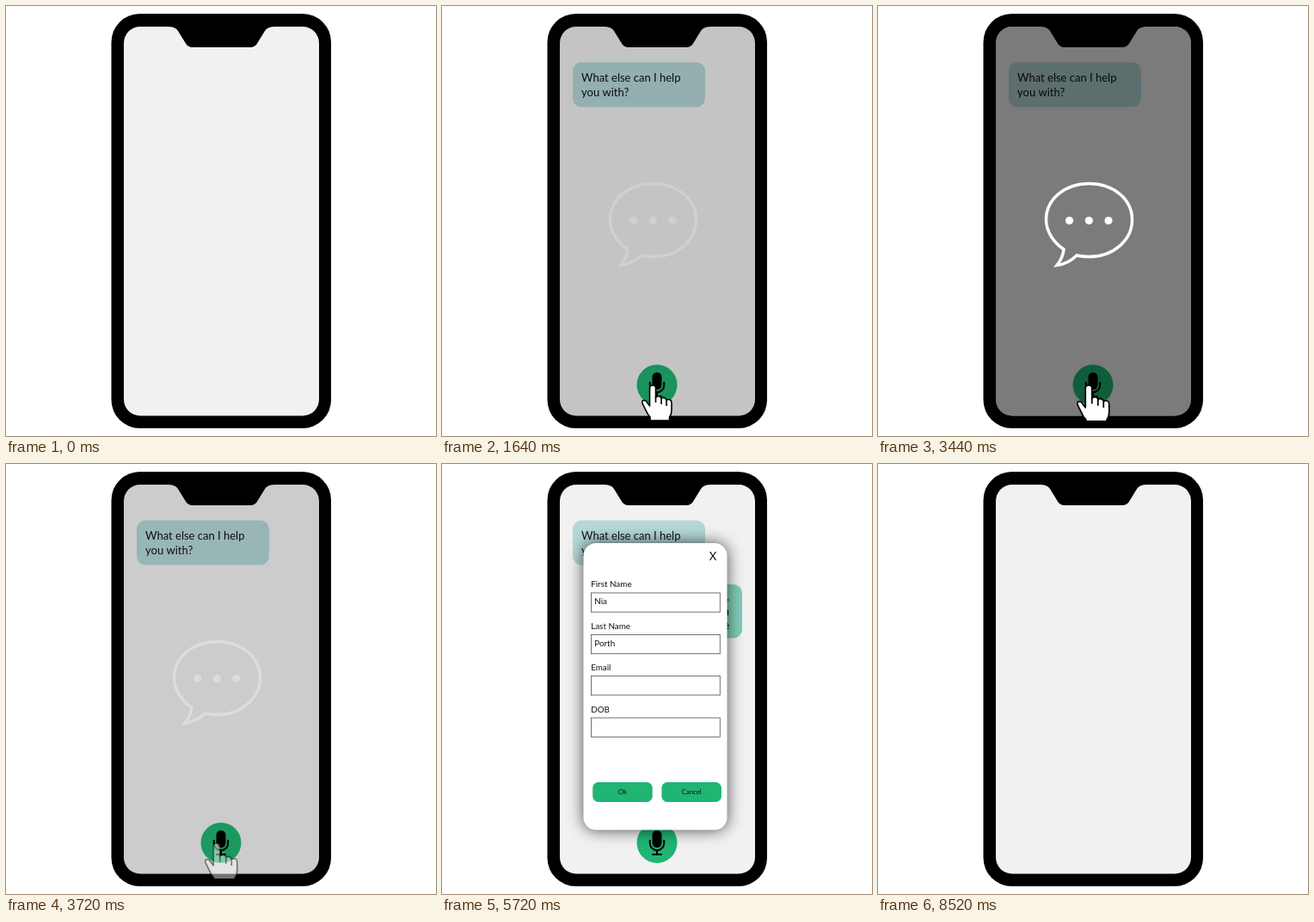
Animation of 500x500 px, one loop 9 s. Source, as an HTML page with a canvas:

```html
<!DOCTYPE html>
<html lang="en">
<head>
<meta charset="utf-8">
<title>Voice assistant</title>
<style>
html, body { margin: 0; width: 100%; height: 100%; overflow: hidden; background: #fff; }
canvas { display: block; width: 500px; height: 500px; }
</style>
</head>
<body>
<canvas id="stage" width="500" height="500"></canvas>
<script>
const ctx = document.getElementById('stage').getContext('2d');
const LOOP = 9000, STEP = 40;
const GREEN = '#20b573';

const clamp = v => Math.max(0, Math.min(1, v));
const ramp = (t, a, b) => clamp((t - a) / (b - a));
const easeOut = p => 1 - (1 - p) ** 2;

function layer(alpha, draw) {
  if (alpha <= 0) return;
  ctx.save();
  ctx.globalAlpha *= alpha;
  draw();
  ctx.restore();
}

function box(x, y, w, h, r, fill) {
  ctx.beginPath();
  ctx.roundRect(x, y, w, h, r);
  ctx.fillStyle = fill;
  ctx.fill();
}

function text(str, x, y, size, align = 'left') {
  ctx.font = `${size}px Lato, "Open Sans", sans-serif`;
  ctx.textAlign = align;
  ctx.fillStyle = '#111';
  ctx.fillText(str, x, y);
}

const screen = new Path2D();
screen.roundRect(137, 24, 227, 452.5, 19);

const notch = new Path2D(
  'M188 23V24Q197 24 200 29L208 42Q211 48 217 48H284Q290 48 293 42L301 29Q304 24 313 24V23Z');

const bubbleIcon = new Path2D(
  'M216 283C206 276 195.5 264 195.5 248.5C195.5 225 217 206.5 245.5 206.5' +
  'S295.5 225 295.5 248.5S274 291.5 245.5 291.5Q238 291.5 231 290' +
  'Q221 300 208 301.5Q215 293 216 283Z');

const handShape = new Path2D(
  'M-3.5 3.5Q-3.5 0 0 0T3.5 3.5V14Q8 11 10 15Q14 13 16 17Q22 15 22 21V29' +
  'Q22 34 19.5 37V41H-3V37Q-6 34 -8 29L-12 21Q-13 16 -8 18L-3.5 24Z');

function phone() {
  box(122.5, 9, 255.5, 482, 33, '#000');
  ctx.fillStyle = '#f1f1f1';
  ctx.fill(screen);
}

function question() {
  box(152, 65.5, 154, 52, 10, '#b5d7d7');
  text('What else can I help', 162, 88, 13);
  text('you with?', 162, 104.5, 13);
}

function reply() {
  box(194, 140, 155, 62.5, 10, '#81ccb8');
  const lines = ['I just hired Nia Porth.', 'Can you create a', 'profile for her please'];
  lines.forEach((line, i) => text(line, 334, 159 + i * 16.7, 13, 'right'));
}

function mic() {
  ctx.beginPath();
  ctx.arc(250, 440.5, 23.5, 0, 7);
  ctx.fillStyle = GREEN;
  ctx.fill();
  box(244.5, 426, 11, 20, 5.5, '#000');
  ctx.beginPath();
  ctx.moveTo(241.8, 437);
  ctx.lineTo(241.8, 441);
  ctx.arc(250, 441, 8.2, Math.PI, 0, true);
  ctx.lineTo(258.2, 437);
  ctx.moveTo(250, 449);
  ctx.lineTo(250, 454);
  ctx.moveTo(244, 454);
  ctx.lineTo(256, 454);
  ctx.lineWidth = 2;
  ctx.strokeStyle = '#000';
  ctx.stroke();
}

function speechIcon() {
  ctx.strokeStyle = ctx.fillStyle = '#fff';
  ctx.lineWidth = 3.5;
  ctx.stroke(bubbleIcon);
  for (const x of [222.5, 245.3, 268]) {
    ctx.beginPath();
    ctx.arc(x, 249.5, 4.6, 0, 7);
    ctx.fill();
  }
}

function hand(x, y, scale = 1) {
  ctx.beginPath();
  ctx.rect(0, 0, 500, 482);
  ctx.clip();
  ctx.translate(x, y);
  ctx.scale(scale, scale);
  ctx.fillStyle = '#fff';
  ctx.fill(handShape);
  ctx.strokeStyle = '#000';
  ctx.lineWidth = 1.6;
  ctx.lineJoin = 'round';
  ctx.stroke(handShape);
  ctx.beginPath();
  for (const [kx, ky] of [[3.5, 13], [10, 15], [16, 17]]) {
    ctx.moveTo(kx, ky);
    ctx.lineTo(kx, ky + 7);
  }
  ctx.stroke();
}

function button(label, x) {
  box(x, 394, 84.5, 28, 8, GREEN);
  text(label, x + 42.2, 411, 9.5, 'center');
}

function field(label, value, y) {
  text(label, 157, y - 7.5, 12);
  ctx.strokeStyle = '#555';
  ctx.lineWidth = 1;
  ctx.strokeRect(157.5, y + 0.5, 182, 27);
  text(value, 162, y + 17, 12);
}

function form(scale) {
  ctx.clip(screen);
  ctx.translate(248, 258.5);
  ctx.scale(scale, scale);
  ctx.translate(-248, -258.5);
  ctx.save();
  ctx.shadowColor = 'rgba(0,0,0,.7)';
  ctx.shadowBlur = 22 * scale;
  box(146.5, 56, 203, 405.5, 18, '#fff');
  ctx.restore();
  text('X', 329.5, 81, 16, 'center');
  field('First Name', 'Nia', 126);
  field('Last Name', 'Porth', 185);
  field('Email', '', 243.5);
  field('DOB', '', 302.5);
  button('Ok', 159.5);
  button('Cancel', 257);
}

function render(t) {
  ctx.fillStyle = '#fff';
  ctx.fillRect(0, 0, 500, 500);
  phone();

  const leave = 1 - ramp(t, 8280, 8520);
  const intro = ramp(t, 0, 280) * leave;
  layer(intro, question);
  layer(intro, mic);

  const slide = easeOut(ramp(t, 3840, 4440));
  layer(slide > 0 ? leave : 0, () => {
    ctx.clip(screen);
    ctx.translate(170 * (1 - slide), 0);
    reply();
  });

  // Listening: dimmed screen with a blinking speech icon
  const dim = ramp(t, 1440, 1960) * (1 - ramp(t, 3460, 3840));
  layer(dim * 0.49, () => {
    ctx.fillStyle = '#000';
    ctx.fill(screen);
  });
  const blink = t > 2000 && t < 2920 ? Math.abs(t - 2480) / 440 : 1;
  const icon = ramp(t, 1560, 1960) * (1 - ramp(t, 3460, 3840));
  layer(icon * clamp(blink), speechIcon);

  if (t >= 5240) {
    const grow = 0.113 + 0.887 * ramp(t, 5240, 5840);
    layer(leave, () => form(grow));
  }

  ctx.fillStyle = '#000';
  ctx.fill(notch);

  if (t >= 1120 && t < 3920) {
    const rise = easeOut(ramp(t, 1080, 1400));
    const lift = 1 + 0.08 * ramp(t, 2920, 3360);
    layer(1 - ramp(t, 3480, 3920), () => hand(245, 482 - 41 * rise, lift));
  }
  if (t >= 7400) {
    const rise = ramp(t, 7360, 7680);
    const press = Math.sin(Math.PI * ramp(t, 7760, 8080));
    layer(leave, () => hand(190 + 10 * rise, 482 - 76 * rise, 1 - 0.08 * press));
  }
}

function tick(now) {
  render(Math.floor((now % LOOP) / STEP) * STEP);
  requestAnimationFrame(tick);
}
render(0);
requestAnimationFrame(tick);
</script>
</body>
</html>
```
